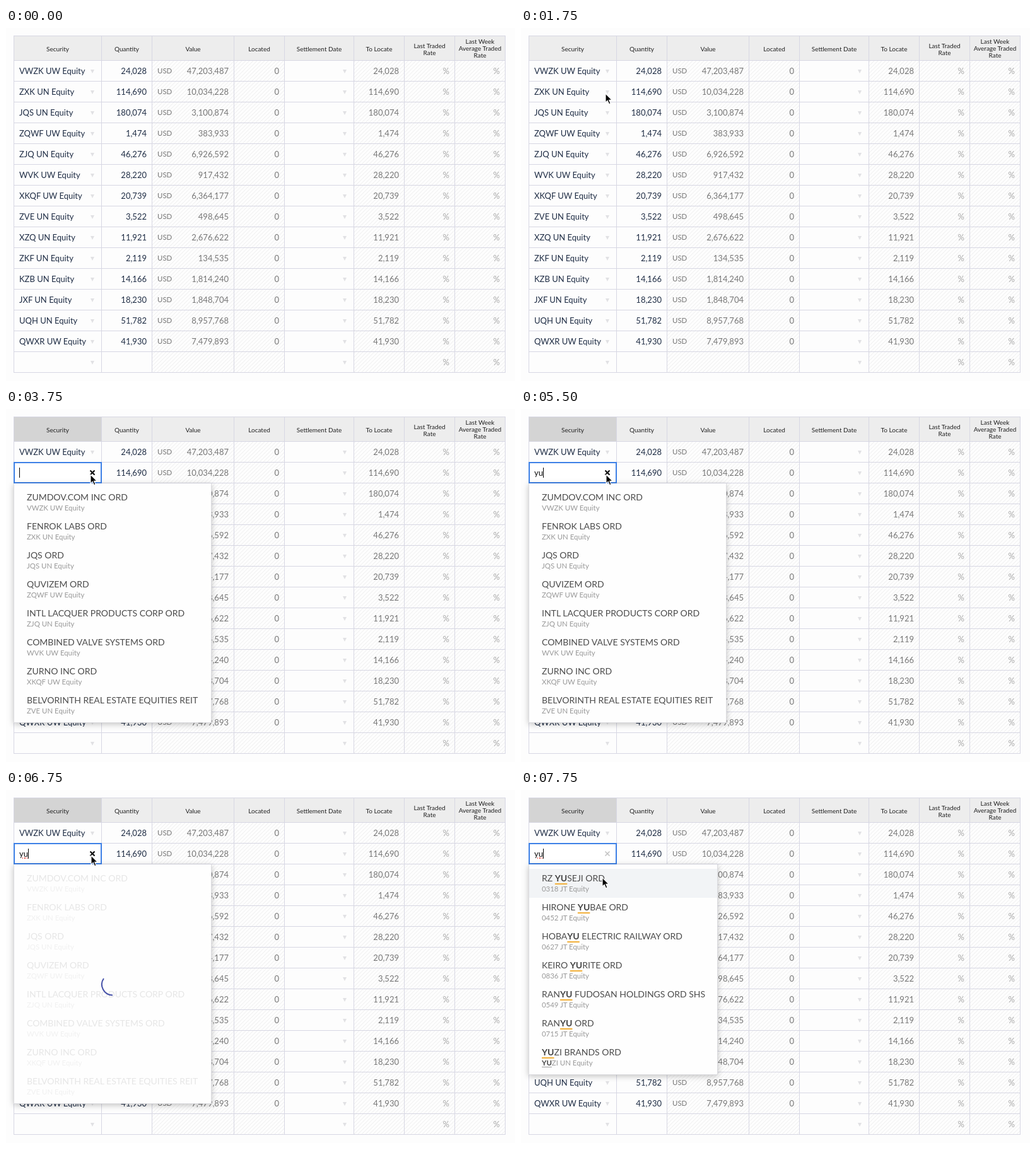
Recreate the animation shown at these times as an HTML page. Size 807 by 560 pixels, loop 8000 ms.

```html
<!DOCTYPE html>
<html lang="en">
<head>
<meta charset="utf-8">
<title>Locate table</title>
<style>
html, body { margin: 0; width: 100%; height: 100%; overflow: hidden; background: #fdfdfd; }
body, text { font-family: Lato, sans-serif; }
#stage { position: relative; width: 807px; height: 560px; overflow: hidden; }
svg { position: absolute; left: 0; top: 0; display: block; }
text { font-size: 13px; fill: #777; }
.head { font-size: 10px; fill: #222; text-anchor: middle; }
.dark { fill: #1f2d45; }
.end { text-anchor: end; }
.small { font-size: 11.4px; }
.pale { fill: #a8a8a8; }
#field { position: absolute; left: 12px; top: 84px; width: 136px; height: 30px; border: 2px solid #3d80e6; background: #fff; }
#typed { position: absolute; left: 7px; top: 7px; font-size: 13px; line-height: 16px; white-space: pre; color: #111; }
#typed.picked { background: #a9d2ff; color: #1f2d45; }
#typed.wrong { text-decoration: underline dotted #e0483e 2px; text-underline-offset: 1px; }
#caret { position: absolute; top: 7px; width: 1px; height: 16px; background: #000; }
.panel { position: absolute; left: 12px; top: 118px; box-sizing: border-box; background: #fefefe; border: 1px solid #dcdce0; border-top: 0; box-shadow: 0 2px 9px rgba(0,0,0,.24); }
.item { position: absolute; left: 0; right: 0; height: 46px; white-space: pre; }
.item div { position: absolute; left: 20px; }
.title { top: 6px; font-size: 14px; line-height: 17px; color: #4c4c4c; }
.code { top: 25px; font-size: 11.4px; line-height: 14px; color: #999; }
.item b { color: #444; text-decoration: underline #f3b13c 1.5px; text-underline-offset: 3px; }
.code b { text-decoration: underline #999 1px; text-underline-offset: 2px; }
#one .title { font-weight: bold; color: #343f93; }
.hover { background: #f2f4f6; }
</style>
</head>
<body>
<div id="stage">
  <svg id="grid" width="807" height="560"></svg>
  <div id="field"><span id="typed"></span><i id="caret"></i></div>
  <div id="one" class="panel"></div>
  <div id="all" class="panel"></div>
  <div id="found" class="panel"></div>
  <svg width="807" height="560">
    <path id="clear" d="M133.5 97.5l7 7m0-7l-7 7" fill="none"/>
    <path id="spinner" fill="none" stroke="#4450a8" stroke-width="2"/>
    <path id="pointer" d="M0 0V14.2L3.2 11.2L5.6 16.8L8 15.8L5.7 10.4H10.2Z" fill="#000" stroke="#fff" stroke-width="1.1"/>
  </svg>
</div>
<script>
const $ = id => document.getElementById(id);
const STEP = 250, LOOP = 8000, ROW = 33, TOP = 51;
const cols = [12, 151, 231, 361, 441, 551, 631, 711, 791];
const heads = ['Security', 'Quantity', 'Value', 'Located', 'Settlement Date', 'To Locate',
  'Last Traded|Rate', 'Last Week|Average Traded|Rate'];
const rows = `VWZK UW,24028,47203487
ZXK UN,114690,10034228
JQS UN,180074,3100874
ZQWF UW,1474,383933
ZJQ UN,46276,6926592
WVK UW,28220,917432
XKQF UW,20739,6364177
ZVE UN,3522,498645
XZQ UN,11921,2676622
ZKF UN,2119,134535
KZB UN,14166,1814240
JXF UN,18230,1848704
UQH UN,51782,8957768
QWXR UW,41930,7479893`.split('\n').map(line => line.split(','));
const titles = ['ZUMDOV.COM INC ORD', 'FENROK LABS ORD', 'JQS ORD', 'QUVIZEM ORD',
  'INTL LACQUER PRODUCTS CORP ORD', 'COMBINED VALVE SYSTEMS ORD', 'ZURNO INC ORD',
  'BELVORINTH REAL ESTATE EQUITIES REIT'];
const matches = [['RZ YUSEJI ORD', '0318 JT'], ['HIRONE YUBAE ORD', '0452 JT'],
  ['HOBAYU ELECTRIC RAILWAY ORD', '0627 JT'], ['KEIRO YURITE ORD', '0836 JT'],
  ['RANYU FUDOSAN HOLDINGS ORD SHS', '0549 JT'], ['RANYU ORD', '0715 JT'],
  ['YUZI BRANDS ORD', 'YUZI UN']];

const label = (x, y, cls, s) => `<text x="${x}" y="${y}" class="${cls}">${s}</text>`;
const box = (x, y, w, h, fill, more = '') =>
  `<rect x="${x}" y="${y}" width="${w}" height="${h}" fill="${fill}" ${more}/>`;
const comma = n => Number(n).toLocaleString('en-US');
const arrow = (x, y) => `<path d="M${x} ${y}h6l-3 6z" fill="#e1e1e4"/>`;

function drawGrid() {
  const bottom = TOP + 15 * ROW;
  let s = `<defs><pattern id="hatch" width="6" height="6" patternUnits="userSpaceOnUse">
    <path d="M-1 1L1-1M0 6L6 0M5 7L7 5" stroke="#ececec" stroke-width=".9"/></pattern></defs>`;
  s += box(12, 12, 780, 39, '#ededed') + box(13, 13, 138, 38, '#d4d4d4', 'id="active"');
  for (const c of [2, 3, 5, 6, 7])
    s += box(cols[c], TOP, cols[c + 1] - cols[c], bottom - TOP, 'url(#hatch)');
  let lines = 'M12 12.5H792';
  for (let r = 0; r <= 15; r++) lines += `M12 ${TOP + r * ROW + .5}H792`;
  for (const x of cols) lines += `M${x + .5} 12V${bottom + 1}`;
  s += `<path d="${lines}" stroke="#d7d7e3" fill="none"/>`;
  heads.forEach((h, c) => {
    const parts = h.split('|'), first = [37, 32, 25][parts.length - 1];
    parts.forEach((p, i) => { s += label((cols[c] + cols[c + 1] + 1) / 2, first + i * 11, 'head', p); });
  });
  for (let r = 0; r < 15; r++) {
    const y = 73 + r * ROW;
    s += arrow(134, y - 7) + arrow(534, y - 7);
    s += label(703, y, 'end pale', '%') + label(783, y, 'end pale', '%');
    if (!rows[r]) continue;
    const [code, qty, value] = rows[r];
    s += label(21, y, 'dark', code + ' Equity') + label(223, y, 'dark end', comma(qty));
    s += label(240, y - 1, 'small', 'USD') + label(353, y, 'end', comma(value));
    s += label(433, y, 'end', 0) + label(623, y, 'end', comma(qty));
  }
  $('grid').innerHTML = s;
}

function fillPanel(id, right, items, mark) {
  const show = s => mark ? s.replace('YU', '<b>YU</b>') : s;
  const el = $(id);
  el.style.width = right - 12 + 'px';
  el.style.height = 12 + items.length * 46 + 'px';
  el.innerHTML = items.map(([title, code], i) =>
    `<div class="item" style="top:${7 + i * 46}px"><div class="title">${show(title)}</div>` +
    `<div class="code">${show(code + ' Equity')}</div></div>`).join('');
}

// Last entry of [time, ...values] that has begun
const at = (track, t) => track.filter(k => k[0] <= t).pop();

const path = [[500, 631, 149], [750, 390, 100], [1000, 248, 82], [1250, 181, 89], [1500, 145, 99],
  [1750, 134, 104], [4250, 135, 104], [7500, 134, 109], [7750, 129, 139]];
const blink = [[0, 0], [3750, 1], [4250, 0], [4750, 1], [6000, 0], [6500, 1], [7000, 0], [7500, 1]];
const typing = [[0, 'ZXK UN Equity'], [3750, ''], [5250, 'y'], [5500, 'yu']];
const listFade = [[0, 1], [5750, .5], [6000, .13]];
const foundFade = [[0, .5], [7250, 1]];

const show = (id, on) => { $(id).style.visibility = on ? 'visible' : 'hidden'; };
const fade = (id, a) => { for (const el of $(id).children) el.style.opacity = a; };

function arc(start, sweep) {
  const point = deg => {
    const a = deg * Math.PI / 180;
    return `${169 + 17 * Math.cos(a)} ${308.5 + 17 * Math.sin(a)}`;
  };
  return `M${point(start)}A17 17 0 0 1 ${point(start + sweep)}`;
}

function render(time) {
  const t = Math.floor(time / STEP) * STEP;
  const open = t >= 2000;
  show('active', open);
  show('field', open);
  show('clear', open);
  show('one', open && t < 3750);
  show('all', t >= 3750 && t < 7000);
  show('found', t >= 7000);
  fade('all', at(listFade, t)[1]);
  fade('found', at(foundFade, t)[1]);
  $('found').firstChild.classList.toggle('hover', t >= 7750);

  const typed = $('typed');
  typed.textContent = at(typing, t)[1];
  typed.className = t < 3750 ? 'picked' : t >= 6500 ? 'wrong' : '';
  show('caret', at(blink, t)[1]);
  $('caret').style.left = 7 + (t < 3750 ? 0 : Math.round(typed.offsetWidth)) + 'px';

  const left = t >= 7750;
  $('clear').setAttribute('stroke', left ? '#c2c2c2' : '#000');
  $('clear').setAttribute('stroke-width', left ? 1.6 : 2);

  show('spinner', t >= 6000 && t < 7000);
  $('spinner').setAttribute('d', arc(90 + (t - 6750) / STEP * 160, 124));

  const p = at(path, t);
  show('pointer', p);
  if (p) $('pointer').setAttribute('transform', `translate(${p[1]} ${p[2]})`);
}

drawGrid();
fillPanel('one', 181, [[titles[1], rows[1][0]]]);
fillPanel('all', 326, titles.map((title, i) => [title, rows[i][0]]));
fillPanel('found', 312, matches, true);

const begin = performance.now();
function tick() {
  render((performance.now() - begin) % LOOP);
  requestAnimationFrame(tick);
}
tick();
</script>
</body>
</html>
```
